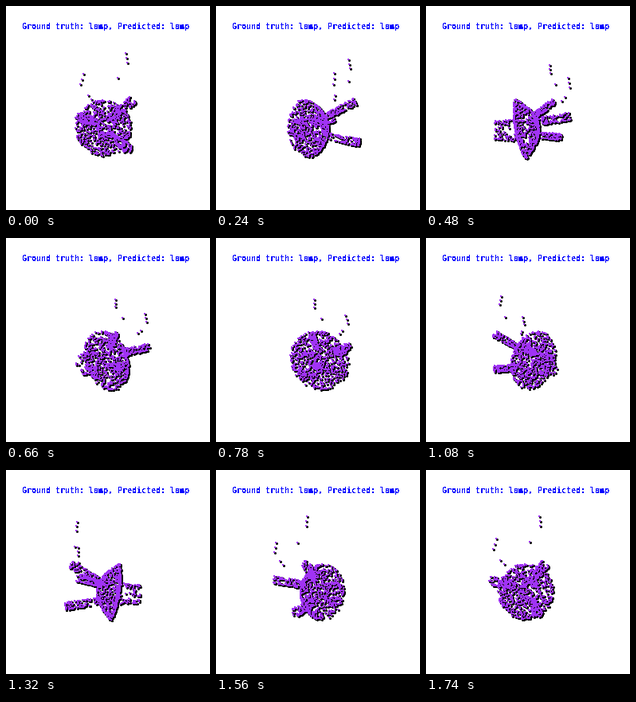
A matplotlib script for the animation above (1800 ms loop, 256 by 256 pixels).

```python
import numpy as np
import matplotlib.pyplot as plt
from matplotlib.animation import FuncAnimation

SIZE, DPI = 256, 64
PX = 72 / DPI                 # points per pixel
FRAMES, STEP_MS = 30, 60
CAMERA = 230                  # camera distance, also the focal length
YAW, PITCH = np.radians([5, 9.3])
rng = np.random.default_rng(7)


def shade(n, bulge):
    """Tilted round sheet, domed by `bulge` along its normal."""
    u, a = rng.random(n), rng.uniform(0, 2 * np.pi, n)
    across, along = 36.5 * np.sqrt(u) * np.array([np.cos(a), np.sin(a)])
    out = bulge * (1 - u)
    up = along * np.cos(PITCH) + out * np.sin(PITCH)
    front = out * np.cos(PITCH) - along * np.sin(PITCH)
    return np.column_stack([across * np.cos(YAW) + front * np.sin(YAW) - 5,
                            up - 26,
                            front * np.cos(YAW) - across * np.sin(YAW) - 10])


def tube(n, start, end, r0, r1):
    """Side wall of a cone from start to end, with a ring at the end."""
    start, end = np.array(start, float), np.array(end, float)
    axis = (end - start) / np.linalg.norm(end - start)
    side = np.cross(axis, [0, 1, 0])
    side /= np.linalg.norm(side)
    other = np.cross(axis, side)
    t = np.minimum(rng.random(n) * 1.12, 1)[:, None]
    a = rng.uniform(0, 2 * np.pi, n)[:, None]
    r = r0 + (r1 - r0) * t
    return start + (end - start) * t + r * (np.cos(a) * side + np.sin(a) * other)


def strand(n, start, end):
    return np.linspace(start, end, n)


cloud = np.vstack([
    shade(400, 24),
    shade(230, -5),
    tube(80, (-2, -28, -14), (-2, -28, -40), 13, 11),
    tube(100, (6, -11, 10), (26, 7, 38), 3.5, 4.5),
    tube(100, (-15, -17, 10), (-28, -10, 45), 4.5, 4.5),
    tube(100, (8, -36, 10), (20, -41, 47), 3.5, 4.5),
    strand(3, (20, 58, 33), (21, 47.5, 34.5)),
    strand(3, (-24, 34, 44.5), (-27, 23, 45)),
    strand(1, (11, 30.5, 38.5), (11, 30.5, 38.5)),
    strand(2, (-20, 12, 42), (-17, 8, 39)),
])


def project(angle):
    x, y, z = cloud.T
    c, s = np.cos(angle), np.sin(angle)
    k = CAMERA / (CAMERA - (z * c - x * s))
    return np.round(np.column_stack([SIZE / 2 + k * (x * c + z * s),
                                     SIZE / 2 - k * y]))


fig = plt.figure(figsize=(SIZE / DPI, SIZE / DPI), dpi=DPI, facecolor="white")
ax = fig.add_axes([0, 0, 1, 1])
ax.set(xlim=(0, SIZE), ylim=(SIZE, 0))
ax.axis("off")

ax.text(20, 29, "Ground truth: lamp, Predicted: lamp", color="#0000ff",
        family="DejaVu Sans Mono", weight="bold", size=10 * PX,
        va="baseline", antialiased=False)


def layer(marker, width, color, **kw):
    return ax.scatter([], [], marker=marker, s=(width * PX) ** 2, c=color,
                      linewidths=0, **kw)


rims = layer("o", 3, "black")
cores = layer("s", 2, "#a033f5", antialiased=False)


def update(i):
    xy = project(2 * np.pi * i / FRAMES)
    rims.set_offsets(xy - 0.5)
    cores.set_offsets(xy - 1)
    return rims, cores


anim = FuncAnimation(fig, update, frames=FRAMES, interval=STEP_MS,
                     repeat=True, repeat_delay=0)
plt.show()
```
